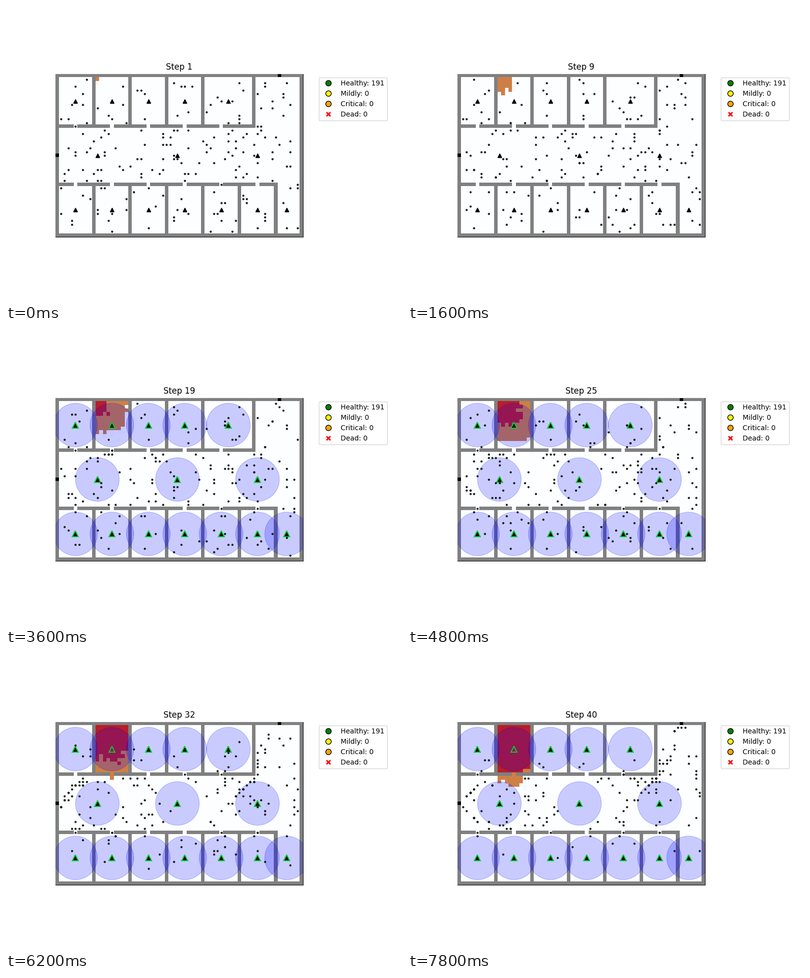
These frames come from a looping animation (800 px wide and 600 px high, 8 s). A matplotlib script:

```python
import random
import numpy as np
import matplotlib.pyplot as plt
from matplotlib.animation import FuncAnimation
from matplotlib.lines import Line2D
from matplotlib.patches import Circle

COLS, ROWS = 68, 45
STEPS, INTERVAL = 40, 200
ALARM, PEOPLE = 15, 191
EMBER_DELAY = 10.5
EXITS = [(61, 0), (0, 22)]
DOORS = [(c, r) for r in (14, 30) for c in range(5, 50, 10)] + [(55, 30)]
SENSORS = ([(c, 7) for c in (5, 15, 25, 35, 47)]
           + [(c, 22) for c in (11, 33, 55)]
           + [(c, 37) for c in (5, 15, 25, 35, 45, 55, 63)])

FLOOR, DOOR, WALL = (252, 254, 255), (255, 255, 255), (128, 128, 128)
SMOKE, FLAME, EMBER = (247, 250, 254), (206, 127, 70), (187, 28, 39)


def build_walls():
    wall = np.zeros((ROWS, COLS), bool)
    wall[[0, -1], :] = True
    wall[:, [0, -1]] = True
    wall[14, :55] = wall[30, :61] = True
    wall[:15, [10, 20, 30, 40, 54]] = True
    wall[30:, 10:61:10] = True
    for c, r in DOORS:
        wall[r, c] = False
    return wall


def ignition_times():
    """Step at which each cell catches fire: a ragged, squarish front."""
    row, col = np.mgrid[:ROWS, :COLS]
    noise = np.random.default_rng(4).normal(0, 1.2, (ROWS, COLS))

    def spread(c, r, start, rate):
        d = ((col - c) ** 4.0 + (row - r) ** 4.0) ** 0.25
        return start + rate * d + noise * (d > 0)

    room = (row < 14) & (col > 10) & (col < 20)
    times = np.where(room, spread(11, 1, 1, 2.25), spread(15, 14, 32, 2.4))
    times[WALLS | ((row < 14) & ~room)] = np.inf
    return times, room


def neighbours(c, r):
    return [(c + i, r + j) for i in (-1, 0, 1) for j in (-1, 0, 1)
            if (i or j) and 0 <= c + i < COLS and 0 <= r + j < ROWS]


def exit_distance():
    dist = {e: 0 for e in EXITS}
    queue = list(EXITS)
    for cell in queue:
        for c, r in neighbours(*cell):
            if not WALLS[r, c] and (c, r) not in dist:
                dist[c, r] = dist[cell] + 1
                queue.append((c, r))
    return dist


def simulate():
    """Wander until the alarm, then react late and head for the nearest exit."""
    rng = random.Random(19)
    dist = exit_distance()
    safe = [(c, r) for c, r in sorted(dist)
            if dist[c, r] and not (ROOM[r, c] and IGNITE[r, c] < 16)]
    people = rng.sample(safe, PEOPLE)
    delay = [0 if ROOM[r, c] else rng.randint(0, 13) for c, r in people]
    tracks = [list(people)]
    for step in range(2, STEPS + 1):
        hot = IGNITE <= step
        for i, cell in enumerate(people):
            if cell is None:
                continue
            c, r = cell
            fleeing = hot[r, c] or step >= ALARM + delay[i]
            pace = 0.95 if fleeing and ROOM[r, c] else 0.48
            if rng.random() > pace or (step >= ALARM and not fleeing):
                continue
            limit = dist[cell] if fleeing else 999
            moves = [p for p in neighbours(c, r)
                     if dist.get(p, 999) < limit
                     and (fleeing or dist[p] > 0)
                     and (hot[r, c] or not hot[p[1], p[0]])]
            if moves:
                cell = rng.choice(moves)
                people[i] = None if cell in EXITS else cell
        tracks.append([p for p in people if p])
    return tracks


def paint(step):
    img = np.empty((ROWS, COLS, 3), np.uint8)
    img[:] = FLOOR
    for c, r in DOORS:
        img[r, c] = DOOR
    img[IGNITE <= step + 2] = SMOKE
    img[WALLS] = WALL
    img[IGNITE <= step] = FLAME
    img[IGNITE + EMBER_DELAY <= step] = EMBER
    for c, r in EXITS:
        img[r, c] = 0
    return img


def working_sensors(step):
    return [(c, r) for c, r in SENSORS
            if IGNITE[r, c] + EMBER_DELAY + 2 > step]


WALLS = build_walls()
IGNITE, ROOM = ignition_times()
TRACKS = simulate()

fig, ax = plt.subplots(figsize=(8, 6), dpi=100)
fig.subplots_adjust(left=0.125, right=0.75, bottom=0.11, top=0.88)
ax.set_xticks([])
ax.set_yticks([])
ax.spines[:].set_zorder(0.5)

floor = ax.imshow(paint(1), interpolation="nearest", zorder=0.8)
title = ax.set_title("Step 1", fontsize=12)
circles = [ax.add_patch(Circle(s, 6, color="blue", alpha=0.2))
           for s in SENSORS]
sensors, = ax.plot([], [], "k^", ms=6)
alarms, = ax.plot(*zip(*SENSORS), "^", ms=8, mfc="none", mec="#00cc33", mew=1.5)
dots, = ax.plot([], [], "o", ms=2, mfc="green", mec="black", mew=1)
ax.set_xlim(-0.5, COLS - 0.5)
ax.set_ylim(ROWS - 0.5, -0.5)


def key(label, marker, color, edge):
    return Line2D([], [], color="w", marker=marker, ms=8, mfc=color,
                  mec=edge, label=label)


ax.legend(handles=[key(f"Healthy: {PEOPLE}", "o", "green", "black"),
                   key("Mildly: 0", "o", "yellow", "black"),
                   key("Critical: 0", "o", "orange", "black"),
                   key("Dead: 0", "X", "red", "white")],
          bbox_to_anchor=(1.05, 1), loc="upper left")


def update(i):
    step = i + 1
    floor.set_data(paint(step))
    title.set_text(f"Step {step}")
    for art in circles + [alarms]:
        art.set_visible(step >= ALARM)
    sensors.set_data(*zip(*working_sensors(step)))
    dots.set_data(*zip(*TRACKS[i]))
    return [floor, title, sensors, alarms, dots, *circles]


anim = FuncAnimation(fig, update, frames=STEPS, interval=INTERVAL,
                     repeat=True, repeat_delay=0, blit=False)
plt.show()
```
